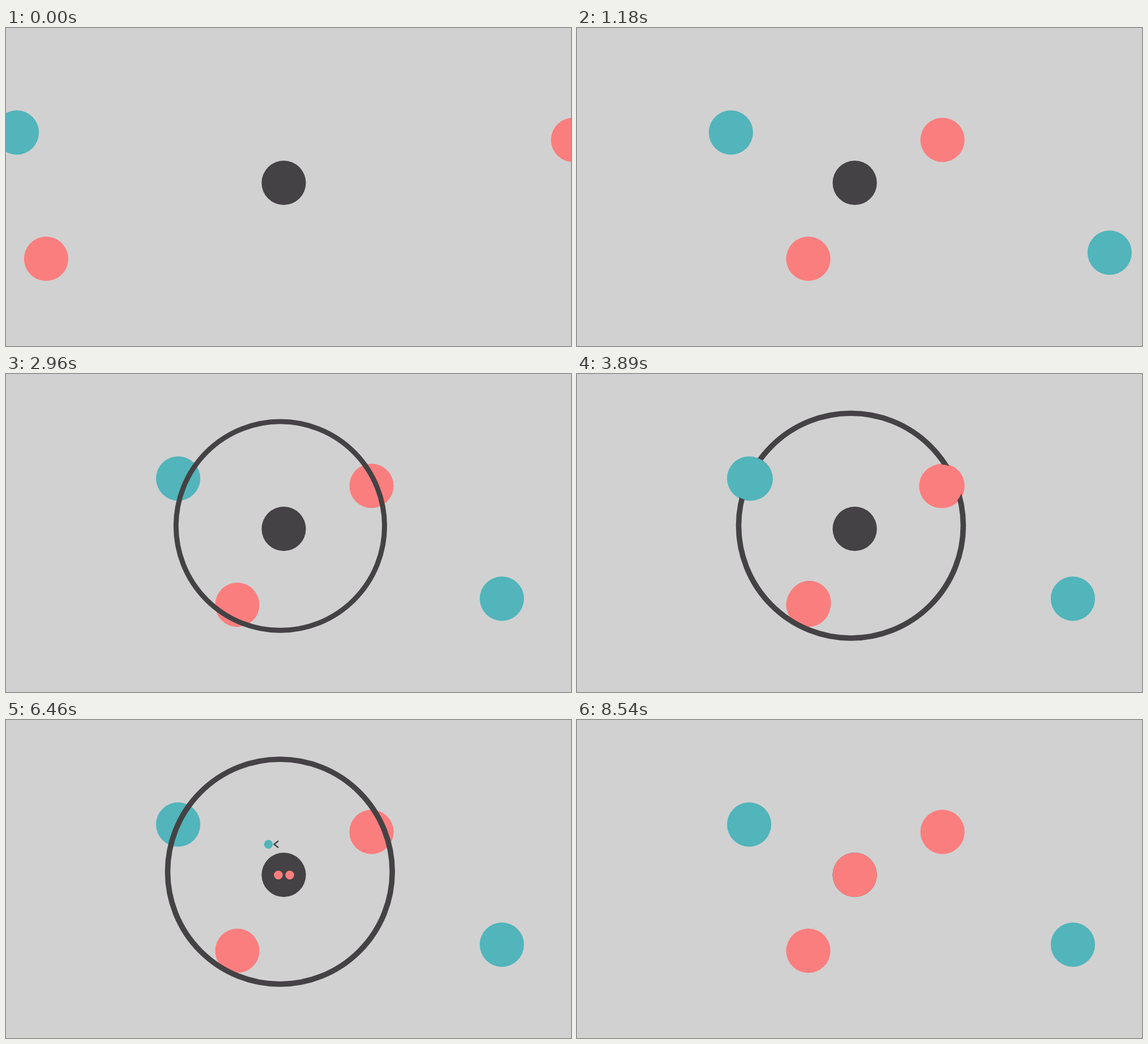
Animation, 998 px wide and 561 px high, one loop 9.74 s. Source, as an HTML page with a canvas:

```html
<!DOCTYPE html>
<html lang="en">
<head>
<meta charset="utf-8">
<title>Nearest neighbours</title>
<style>
html, body { margin: 0; width: 100%; height: 100%; overflow: hidden; background: #d1d1d1; }
canvas { display: block; width: 998px; height: 561px; }
</style>
</head>
<body>
<canvas id="stage" width="998" height="561"></canvas>
<script>
const ctx = document.getElementById('stage').getContext('2d');
const LOOP = 9740;
const BACK = '#d1d1d1', TEAL = '#51b5bb', CORAL = '#fb7e7e', DARK = '#444244';
const R = 39.1, SMALL = 7.8;
const CENTER = { x: 490.6, y: 273.2 };
const RING = { x: 483.9, y: 267.6, outer: 203.2, width: 9.6 };

// Points slide in from "from" to "x"; "tag" is where a shrunken copy lands.
const points = [
  { from: -10, x: 304.1, y: 184.3, start: -360, end: 1563, color: TEAL, tag: { x: 463.6, y: 219.2 } },
  { from: -39, x: 408.6, y: 407.2, start: -415, end: 873, color: CORAL,
    tag: { x: 490.6, y: 219.2 }, vote: { x: 481, y: 273.6 } },
  { from: 1038, x: 645.6, y: 197.4, start: -264, end: 1148, color: CORAL,
    tag: { x: 508.8, y: 219.2 }, vote: { x: 501.2, y: 273.6 } },
  { from: 1038, x: 875.9, y: 396.3, start: 620, end: 1610, color: TEAL }
];

const mix = (a, b, k) => a + (b - a) * k;
const linear = (t, start, end) => Math.min(1, Math.max(0, (t - start) / (end - start)));
const smooth = u => u * u * (3 - 2 * u);
const ease = (t, start, end) => smooth(linear(t, start, end));

function disc(x, y, r, color, alpha = 1) {
  ctx.globalAlpha = alpha;
  ctx.fillStyle = color;
  ctx.beginPath();
  ctx.arc(x, y, r, 0, 2 * Math.PI);
  ctx.fill();
}

function ring(t, alpha) {
  if (t < 1890) return;
  const k = smooth(linear(t, 1890, 3136) ** 1.337);
  const scale = mix(0.19, 1, k);
  ctx.globalAlpha = alpha;
  ctx.strokeStyle = DARK;
  ctx.lineWidth = RING.width * scale;
  ctx.beginPath();
  ctx.arc(mix(CENTER.x, RING.x, k), mix(CENTER.y, RING.y, k),
    (RING.outer - RING.width / 2) * scale, 0, 2 * Math.PI);
  ctx.stroke();
}

function lessThan(alpha) {
  ctx.globalAlpha = alpha;
  ctx.strokeStyle = DARK;
  ctx.lineWidth = 2.4;
  ctx.beginPath();
  ctx.moveTo(481.2, 213.2);
  ctx.lineTo(473.6, 219.2);
  ctx.lineTo(481.2, 225.2);
  ctx.stroke();
}

function copy(point, t, alpha) {
  const { tag, vote, color } = point;
  const k = ease(t, 3800, 4860);
  let x = mix(point.x, tag.x, k), y = mix(point.y, tag.y, k);
  if (vote) {
    const drop = ease(t, 5820, 6460);
    x = mix(x, vote.x, drop);
    y = mix(y, vote.y, drop);
  }
  disc(x, y, mix(R, SMALL, k), color, alpha);
}

function draw(t) {
  const fade = 1 - linear(t, 7860, 8540);
  ctx.globalAlpha = 1;
  ctx.fillStyle = BACK;
  ctx.fillRect(0, 0, 998, 561);

  for (const p of points) disc(mix(p.from, p.x, ease(t, p.start, p.end)), p.y, R, p.color);
  ring(t, fade);
  disc(CENTER.x, CENTER.y, R, DARK);
  if (t >= 3800) points.filter(p => p.tag).forEach(p => copy(p, t, fade));
  disc(CENTER.x, CENTER.y, R, CORAL, ease(t, 6690, 7640));
  lessThan(linear(t, 4870, 5110) * fade);
}

const begin = performance.now();
function tick() {
  draw((performance.now() - begin) % LOOP);
  requestAnimationFrame(tick);
}
tick();
</script>
</body>
</html>
```
